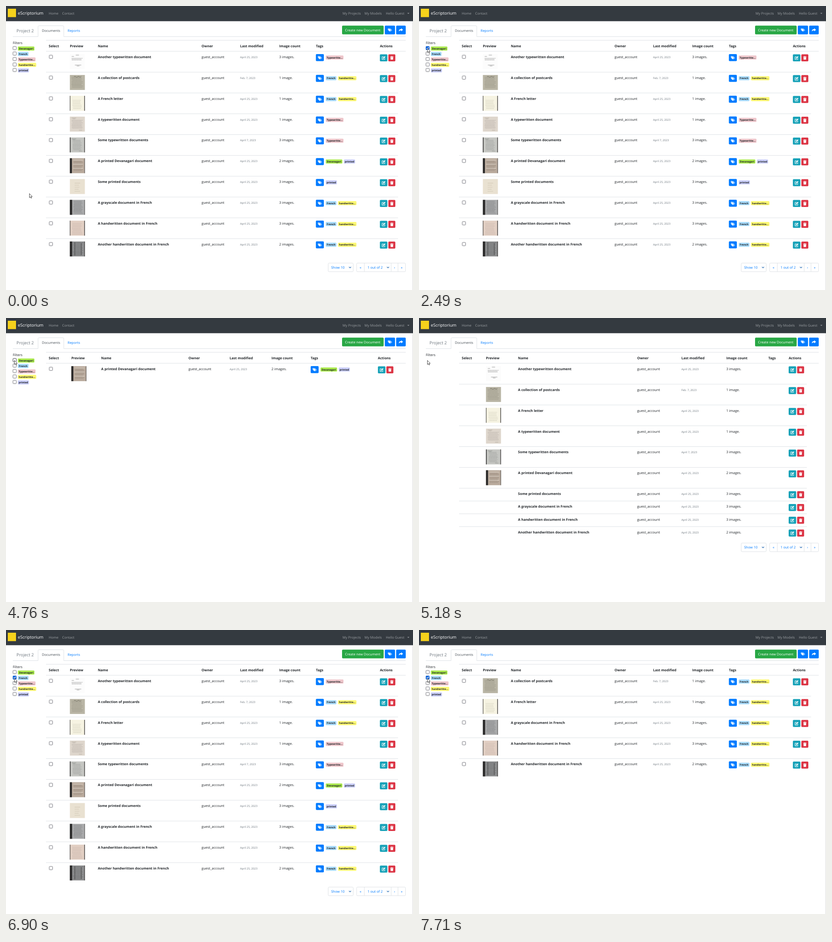
Animation, 895 px wide and 626 px high, one loop 8 s. Source, as an HTML page:

```html
<!DOCTYPE html>
<html lang="en">
<head>
<meta charset="utf-8">
<title>Document filters</title>
<style>
  html, body { margin: 0; width: 100%; height: 100%; overflow: hidden; background: #fff; }
  svg { display: block; width: 895px; height: 626px; }
  text { font-family: "Open Sans", "Noto Sans", sans-serif; text-rendering: geometricPrecision; white-space: pre; }
</style>
</head>
<body>
<svg viewBox="0 0 895 626"><g id="page"></g><g id="table"></g><g id="filters"></g><g id="pointer"></g></svg>
<script>
const LOOP = 8000;
const INK = '#212529', MUTED = '#6c757d', BLUE = '#007bff', RULE = '#dee2e6';
const TEAL = '#17a2b8', RED = '#dc3545';

const TAGS = {
  Devanagari: ['#aae94d', 36.5],
  French: ['#a7dafa', 23.5],
  'Typewritte...': ['#eec6cb', 39],
  'handwritte...': ['#fdf873', 40.5],
  printed: ['#c9cdf8', 24.5]
};
const TAG_NAMES = Object.keys(TAGS);
const [DEVA, FRENCH, TYPED, HAND, PRINTED] = TAG_NAMES;

// look: paper, ink, dark left strip, dark right strip, first text line, last text line, line gap, side margin
const DOCS = [
  ['Another typewritten document', 'April 25, 2023', 3, [TYPED], ['#fcfcfc', '#777', 0, 0, 9, 13, 2, 4]],
  ['A collection of postcards', 'Feb. 7, 2023', 1, [FRENCH, HAND], ['#b9b5a5', '#6f6c5f', 0, 0, 5, 29, 3.2, 4]],
  ['A French letter', 'April 25, 2023', 1, [FRENCH, HAND], ['#f6f3e2', '#a9a690', 1, 1.5, 10, 30, 3.6, 5]],
  ['A typewritten document', 'April 25, 2023', 1, [TYPED], ['#ded6cc', '#a89f98', 0, 0, 8, 27, 2, 4]],
  ['Some typewritten documents', 'April 7, 2023', 3, [TYPED], ['#c5c6c2', '#8a8c89', 1.5, 1.5, 6, 28, 2, 5]],
  ['A printed Devanagari document', 'April 25, 2023', 2, [DEVA, PRINTED], ['#b9aa9c', '#85786d', 4.5, 1, 4, 29, 2.1, 3]],
  ['Some printed documents', 'April 25, 2023', 3, [PRINTED], ['#e9e1d1', '#b3a793', 0, 0, 9, 27, 4.5, 10]],
  ['A grayscale document in French', 'April 25, 2023', 3, [FRENCH, HAND], ['#a9aaab', '#68696b', 5, 1, 3, 31, 2.2, 3]],
  ['A handwritten document in French', 'April 25, 2023', 3, [FRENCH, HAND], ['#e2cfc3', '#b39e96', 1, 1.5, 6, 30, 3, 4]],
  ['Another handwritten document in French', 'April 25, 2023', 2, [FRENCH, HAND], ['#8d8e8f', '#4b4c4d', 5, 1.5, 3, 31, 2.4, 2]]
];
const ALL = DOCS.map((_, i) => i);
const withTag = tag => ALL.filter(i => DOCS[i][3].includes(tag));

const VIEWS = [
  { at: 0, rows: ALL, thumbs: 10, loaded: true },
  { at: 2630, rows: withTag(DEVA), thumbs: 0 },
  { at: 3030, rows: withTag(DEVA), thumbs: 1 },
  { at: 3280, rows: withTag(DEVA), thumbs: 1, loaded: true },
  { at: 5030, rows: ALL, thumbs: 4 },
  { at: 5180, rows: ALL, thumbs: 6 },
  { at: 5300, rows: ALL, thumbs: 10, loaded: true },
  { at: 7050, rows: withTag(FRENCH), thumbs: 2 },
  { at: 7450, rows: withTag(FRENCH), thumbs: 5 },
  { at: 7710, rows: withTag(FRENCH), thumbs: 5, loaded: true }
];
// time, x, y of the pointer's hot spot
const MOVES = [
  [0, 51.5, 413.5], [570, 51.5, 409.5], [710, 50, 350], [835, 46, 270], [960, 48, 213.5],
  [1240, 47, 160], [1360, 45, 124.5], [1640, 31.5, 100], [1790, 21, 96], [1920, 19.5, 94.5],
  [2060, 19, 94.5], [2210, 18.5, 93.5], [5870, 18.5, 103.5], [6020, 18.5, 110.5],
  [6330, 18.5, 108.5], [6480, 18.5, 106.5]
];

const latest = (list, t, time) => list.filter(item => time(item) <= t).pop();
const text = (x, y, s, fill = INK, size = 7.5, extra = '') =>
  `<text x="${x}" y="${y}" fill="${fill}" font-size="${size}" ${extra}>${s}</text>`;
const rect = (x, y, w, h, fill, extra = '') =>
  `<rect x="${x}" y="${y}" width="${w}" height="${h}" fill="${fill}" ${extra}/>`;
const path = (d, extra = 'fill="#fff"') => `<path d="${d}" ${extra}/>`;
const line = (d, color = RULE, width = 1) => path(d, `fill="none" stroke="${color}" stroke-width="${width}"`);
const at = (x, y, s) => `<g transform="translate(${x} ${y})">${s}</g>`;
const BOLD = 'font-weight="700"', CENTER = 'text-anchor="middle"';

const ICONS = {
  tags: path('M0 .6V3.6L3.9 7.4L7 4.3L3.2.6Z') + line('M4.9.7L8.6 4.3L5.6 7.4', '#fff', 1) +
    `<circle cx="1.7" cy="2.2" r=".75" fill="${BLUE}"/>`,
  share: path('M0 7.4C-.3 3.6 2 2.3 5 2.3V.3L9 3.7L5 7V4.9C2.4 4.9 1 5.3 0 7.4Z'),
  edit: line('M4.6 1.6H.6V7.6H6.6V4.8', '#fff', 1) + path('M2.6 4.2L6.5.4L8 1.9L4.1 5.7L2.3 6Z'),
  trash: path('M0 .9H2L2.5.2H4.5L5 .9H7V1.9H0ZM.5 2.4H6.5L6.1 8H.9Z')
};
const button = (x, y, w, h, fill, icon, dx, dy) =>
  rect(x, y, w, h, fill, 'rx="1.8"') + at(x + dx, y + dy, ICONS[icon]);

const chip = (x, y, name) => {
  const [fill, w] = TAGS[name];
  return rect(x, y, w, 9, fill, 'rx="1.8"') + text(x + w / 2, y + 6.6, name, INK, 5.6, `${BOLD} ${CENTER}`);
};

const checkbox = (cx, cy, { hover, pressed, checked } = {}) => {
  const edge = checked ? '#0a60d6' : pressed ? '#55565f' : hover ? '#3c3d44' : '#74757c';
  const fill = checked ? '#0a60d6' : pressed ? '#d5d5da' : '#fff';
  const tick = checked ? line(`M${cx - 2.4} ${cy + .1}l1.7 1.8l3.2 -3.8`, '#fff', 1.2) : '';
  return rect(cx - 3.7, cy - 3.7, 7.4, 7.4, fill, `rx="1.2" stroke="${edge}"`) + tick;
};

const random = seed => () => {
  seed = (seed * 16807) % 2147483647;
  return seed / 2147483647;
};

function thumbnail(x, y, index) {
  const [paper, ink, left, right, top, bottom, gap, margin] = DOCS[index][4];
  const next = random(index * 7919 + 131);
  let s = rect(0, 0, 33, 33, paper) + rect(0, 0, left, 33, '#2b2a2a') + rect(33 - right, 0, right, 33, '#4d4b4a');
  for (let ly = top; ly <= bottom; ly += gap) {
    const x1 = left + margin + next() * 2, x2 = 33 - right - margin - next() * 4;
    s += path(`M${x1} ${ly}H${x2}`,
      `stroke="${ink}" stroke-width=".8" stroke-dasharray="${1 + next() * 2} .7" opacity=".75"`);
  }
  if (index === 0) s += line('M13 2H20M4 5H9M11 24H25M15 26H21', '#888', .8);
  if (index === 1) s += line('M9 4q2 -2 4 0t4 0t4 0t4 -1', '#5f5c50', .8);
  if (index === 3 || index === 4) s += line('M4 3H14M6 5H12M20 30H27', ink, .7);
  if (index === 5) s += line('M7 4H29M7 13H29M7 22H29', '#ddd3c8', 1.2);
  if (index === 9) s += line('M11 2V31M25 4V30', '#3b3b3b', .8);
  return at(x, y, s);
}

function drawPage() {
  const nav = '#999da0';
  return rect(0, 0, 895, 33.5, '#343a40') + rect(4, 6, 18, 18.5, '#f6d21c') +
    text(26, 19, 'eScriptorium', '#fff', 9.35) +
    text(94, 19, 'Home', nav) + text(123.5, 19, 'Contact', nav) +
    text(740, 19, 'My Projects', nav) + text(788.3, 19, 'My Models', nav) + text(835.3, 19, 'Hello Guest', nav) +
    path('M882.5 15.2h4.6l-2.3 2.3z', `fill="${nav}"`) +
    line('M894.5 34V626', '#dcdcdc') +
    line('M15 67.5H70.5V45.5q0 -2 2 -2H125q2 0 2 2V67.5H879') +
    text(23, 58.3, 'Project 2', MUTED, 9.4) + text(79, 57, 'Documents', '#495057') + text(135.5, 57, 'Reports', BLUE) +
    rect(739, 43.3, 91.5, 19.2, '#28a745', 'rx="2"') + text(745.5, 55.6, 'Create new Document', '#fff') +
    button(833, 43.3, 22.5, 19.2, BLUE, 'tags', 6.8, 5.5) + button(858, 43.3, 21, 19.2, BLUE, 'share', 6, 5.5) +
    text(15, 84, 'Filters');
}

function drawPager(cy) {
  const chevron = x => line(`M${x - 2.3} ${cy - 1.3}l2.3 2.4l2.3 -2.4`, '#2d6fb5', 1.2);
  const frame = (x, w) => rect(x, cy - 9.5, w, 19, 'none', `rx="2" stroke="${RULE}"`);
  const label = (x, s, extra) => text(x, cy + 2.7, s, BLUE, 7.5, extra);
  return frame(708.5, 55) + frame(771, 107.5) +
    line([788, 847, 862].map(x => `M${x} ${cy - 9.5}v19`).join('')) +
    label(715, 'Show 10') + chevron(756.5) + label(779.5, '«', CENTER) + label(795, '1 out of 2') +
    chevron(840) + label(854.5, '›', CENTER) + label(870, '»', CENTER);
}

// Column widths share the table's width in proportion to their content.
function columns({ rows, thumbs, loaded }) {
  const single = rows.length === 1;
  const content = [34, thumbs ? 45 : 41.5, single ? 131.5 : 167, 62, 63, 59, loaded ? (single ? 101.3 : 103) : 28.5, 46];
  const scale = 791 / content.reduce((a, b) => a + b);
  let x = 94;
  return content.map(w => (x += w * scale) - w * scale);
}

function drawTable(view) {
  const x = columns(view);
  const [, preview, name, owner, date, count, tags, actions] = x;
  const heads = ['Select', 'Preview', 'Name', 'Owner', 'Last modified', 'Image count', 'Tags', 'Actions'];
  let s = line('M88 75.5H879M88 99.8H879') + heads.map((h, i) => text(x[i], 90.6, h, INK, 7.5, BOLD)).join('');
  let y = 100;
  view.rows.forEach((doc, i) => {
    const [title, day, images, docTags] = DOCS[doc];
    if (i) s += line(`M88 ${y}H${actions + 40}`);
    if (i < view.thumbs) s += thumbnail(preview, y + 6.2, doc);
    s += text(name, y + 15, title, INK, 7.5, BOLD) + text(owner, y + 15, 'guest_account') +
      text(date, y + 15, day, MUTED, 6) + text(count, y + 15, `${images} image${images > 1 ? 's' : ''}.`);
    if (view.loaded) {
      s += checkbox(98.8, y + 12) + button(tags, y + 6, 17.5, 15.5, BLUE, 'tags', 4.4, 4);
      let tx = tags + 21.7;
      for (const tag of docTags) {
        s += chip(tx, y + 9, tag);
        tx += TAGS[tag][1] + 3.5;
      }
    }
    s += button(actions, y + 6.5, 16.5, 15.5, TEAL, 'edit', 4.2, 3.8) +
      button(actions + 18.6, y + 6.5, 15.4, 15.5, RED, 'trash', 4.2, 3.8);
    y += i < view.thumbs ? 45.87 : 28.2;
  });
  return s + (view.rows.length === 10 ? drawPager(y + 17.5) : '');
}

function drawFilters(t, loaded) {
  if (!loaded) return '';
  const during = (from, to) => t >= from && t < to;
  const states = [
    { hover: during(1790, 6020), pressed: during(2360, 2490), checked: during(2490, 4760) },
    { hover: t >= 6330, pressed: during(6630, 6750), checked: t >= 6750 }
  ];
  return TAG_NAMES.map((tag, i) =>
    checkbox(19, 92.8 + i * 12.05, states[i]) + chip(26, 89.2 + i * 12.05, tag)).join('');
}

function drawPointer(t) {
  const [time, x, y] = latest(MOVES, t, m => m[0]);
  const shape = time === 1640
    ? line('M-2.3 -4.5H-.8L0 -4L.8 -4.5H2.3M0 -4V4M-2.3 4.5H-.8L0 4L.8 4.5H2.3', '#222', .9)
    : path('M0 0V9L2.1 7.1L3.5 10.2L4.9 9.6L3.5 6.6H6.3Z', 'fill="#fff" stroke="#222" stroke-width=".8"');
  return at(x, y, shape);
}

const shown = {};
function show(id, markup) {
  if (shown[id] !== markup) document.getElementById(id).innerHTML = shown[id] = markup;
}

function frame() {
  const t = performance.now() % LOOP;
  const view = latest(VIEWS, t, v => v.at);
  view.markup ||= drawTable(view);
  show('table', view.markup);
  show('filters', drawFilters(t, view.loaded));
  show('pointer', drawPointer(t));
  requestAnimationFrame(frame);
}
show('page', drawPage());
frame();
</script>
</body>
</html>
```
